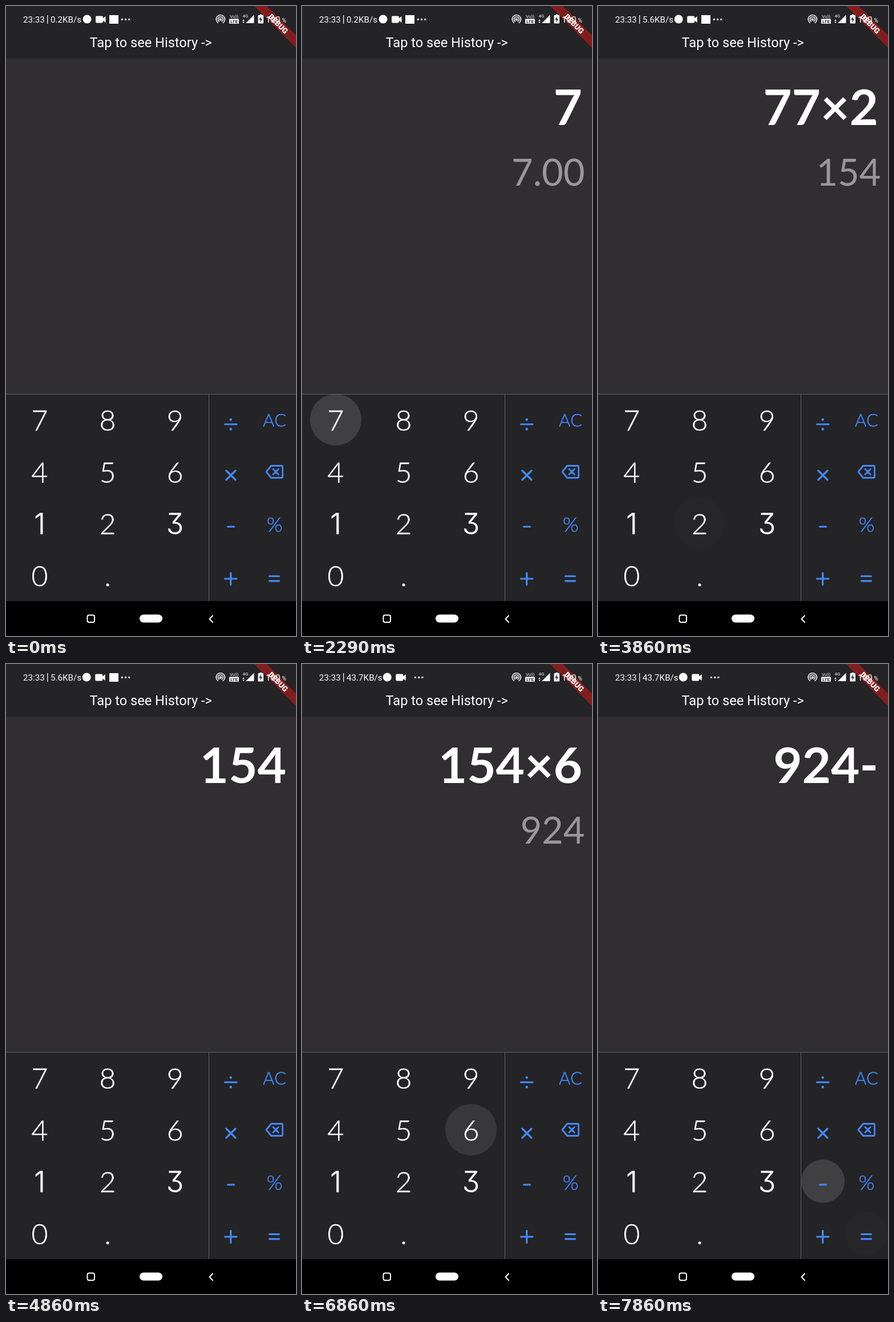
An HTML page that plays this animation: 508 by 1101 pixels, repeating every 8000 ms.

```html
<!DOCTYPE html>
<html lang="en">
<head>
<meta charset="utf-8">
<title>Calculator</title>
<style>
  html, body { margin: 0; width: 100%; height: 100%; overflow: hidden; background: #000; }
  svg { display: block; width: 100%; height: 100%; }
  text { fill: #fff; }
  .line { fill: none; stroke-linecap: round; stroke-linejoin: round; }
  .status { font: 15.2px Roboto, sans-serif; }
  .tiny { font: 8px Roboto, sans-serif; }
  .key { font: 300 50px Lato, sans-serif; text-anchor: middle; stroke: #fff; stroke-width: .5; stroke-linejoin: round; }
  .plain { font-family: Inter, sans-serif; font-feature-settings: "cv09"; }
  .blue { fill: #448aff; stroke: #448aff; }
  .output { text-anchor: end; font-family: Lato, sans-serif; }
</style>
</head>
<body>
<svg viewBox="0 0 508 1101" preserveAspectRatio="none">
  <rect width="508" height="1101" fill="#302e31"/>
  <rect width="508" height="92" fill="#242326"/>
  <rect y="678" width="508" height="362" fill="#242326"/>
  <g id="ripples" fill="#fff"></g>
  <path d="M0 678.5H508M355.5 678V1040" stroke="#55676b" fill="none"/>
  <rect y="1040" width="508" height="61"/>

  <text x="253.7" y="72" text-anchor="middle" font-family="Roboto, sans-serif" font-size="23.6">Tap to see History -&gt;</text>
  <text id="expression" class="output" x="491" y="208" font-size="87" font-weight="700"/>
  <text id="result" class="output" x="495.5" y="314" font-size="65" style="fill:#98979a"/>

  <g id="keys"></g>
  <g class="line" stroke="#448aff" stroke-width="3.2">
    <path d="M383.5 731H404M385.8 812L402 828M402 812L385.8 828M388.5 910H399.5M383.5 1001H404M393.7 990.5V1011.5M461.5 996.5H478.5M461.5 1004.8H478.5"/>
    <path d="M393.7 722.7v.01M393.7 739.4v.01" stroke-width="4.6"/>
    <path d="M464.5 803.5H482.5Q484.5 803.5 484.5 805.5V822.5Q484.5 824.5 482.5 824.5H464.5L456 814ZM468 809.3L477.3 818.7M477.3 809.3L468 818.7" stroke-width="2.8"/>
  </g>

  <!-- Corner ribbon -->
  <g transform="translate(508 0) rotate(45)">
    <rect x="-80" y="36.2" width="160" height="15.6" fill="#b71c1c" opacity=".63"/>
    <text y="48.7" text-anchor="middle" font-family="Roboto, sans-serif" font-size="13.2" font-weight="900">DEBUG</text>
  </g>

  <!-- Status bar -->
  <text class="status" x="30" y="28.5">23:33</text>
  <path d="M72.8 16V31" stroke="#fff" stroke-width="1.3"/>
  <text id="speed" class="status" x="78" y="28.5"/>
  <g id="notices" fill="#fff">
    <circle cx="142" cy="23" r="7.5"/>
    <path d="M159 17.5h9q2 0 2 2v2l4.5-3.5v11l-4.5-3.5v2q0 2-2 2h-9q-2 0-2-2v-8q0-2 2-2Z"/>
  </g>
  <rect id="square" x="181" y="16" width="16" height="15" fill="#fff"/>
  <path id="dots" class="line" d="M203.5 23.5v.01M209.7 23.5v.01M215.9 23.5v.01" stroke="#fff" stroke-width="3.4"/>
  <g class="line" stroke="#fff" stroke-width="1.6">
    <path d="M371.3 29.4A7.6 7.6 0 1 1 380.3 29.4M373.2 26.7A4.4 4.4 0 1 1 378.4 26.7"/>
    <circle cx="375.8" cy="23.5" r="1.4" fill="#fff"/>
  </g>
  <text class="tiny" x="392" y="21" font-weight="700">Vo))</text>
  <rect x="391" y="22.5" width="17" height="8.5" rx="1" fill="#fff"/>
  <text class="tiny" x="399.5" y="29.8" text-anchor="middle" style="fill:#242326;font-weight:700">LTE</text>
  <text class="tiny" x="414.5" y="20">4G</text>
  <path d="M434.5 15.5V30H420Z M414 26l2-2.5 2 2.5Z M414 27.5l2 2.5 2-2.5Z" fill="#fff"/>
  <path d="M444.5 16V14.7h3.5V16h2q1 0 1 1V29.5q0 1-1 1h-7.5q-1 0-1-1V17q0-1 1-1Z" fill="#fff"/>
  <path d="M447 18l-3.8 6h2.6l-.6 4.7 3.9-6.2h-2.7Z" fill="#242326"/>
  <text class="status" x="455" y="28.5">100</text>
  <text x="483.5" y="28.5" font-family="Roboto, sans-serif" font-size="10">%</text>

  <!-- Navigation bar -->
  <rect x="142.5" y="1064.5" width="12.5" height="12.5" rx="3" fill="none" stroke="#fff" stroke-width="2"/>
  <rect x="234" y="1063.5" width="40" height="14" rx="7" fill="#fff"/>
  <path class="line" d="M362 1065.5L356.5 1071.2L362 1077" stroke="#fff" stroke-width="2"/>
</svg>
<script>
const LOOP = 8000, FPS = 7, FADE = 3.2;
const columns = [59, 178, 296, 394, 470];
const rows = [723, 814, 904, 995];
const layout = ["789÷C", "456×<", "123-%", "0. +="];
const byId = id => document.getElementById(id);

function add(parent, tag, attributes, content = "") {
  const node = document.createElementNS("http://www.w3.org/2000/svg", tag);
  for (const name in attributes) node.setAttribute(name, attributes[name]);
  node.textContent = content;
  return parent.appendChild(node);
}

const place = key => {
  const row = layout.findIndex(line => line.includes(key));
  const column = layout[row].indexOf(key);
  return { x: columns[column], y: rows[row], radius: column < 3 ? 45 : 38 };
};

for (const key of "7894561230.") {
  const { x, y } = place(key);
  add(byId("keys"), "text", { x, y: y + 19, class: "13".includes(key) ? "key plain" : "key" }, key);
}
add(byId("keys"), "text", { x: 470.5, y: 735, class: "key blue", style: "font-size:31px" }, "AC");
add(byId("keys"), "text", { x: 470.5, y: 918.5, class: "key blue", style: "font-size:36px" }, "%");

// step of the tap, key, expression and result it leaves behind
const taps = [
  [16, "7", "7", "7.00"],
  [18, "7", "77", "77.00"],
  [21, "×", "77×", "77.00"],
  [24, "2", "77×2", "154"],
  [30, "=", "154", ""],
  [39, "×", "154×", ""],
  [47, "6", "154×6", "924"],
  [52, "=", "924", ""],
  [55, "-", "924-", ""]
].map(([step, key, expression, result]) => {
  const { x, y, radius } = place(key);
  const ripple = add(byId("ripples"), "circle", { cx: x, cy: y });
  return { step, expression, result, radius, ripple };
});

function drawRipple({ step, radius, ripple }, now) {
  const age = now - step;
  const strength = age < -1 ? 0 : age < 0 ? 0.6 : Math.max(0, 1 - age / FADE);
  ripple.setAttribute("r", age < 0 ? radius * 0.7 : radius);
  ripple.setAttribute("opacity", strength * 0.13);
}

function draw(time) {
  const now = Math.floor((time % LOOP + 4) * FPS / 1000);
  const last = taps.filter(tap => tap.step <= now).pop();
  byId("expression").textContent = last ? last.expression : "";
  byId("result").textContent = last ? last.result : "";
  taps.forEach(tap => drawRipple(tap, now));

  const busy = now >= 48;
  byId("speed").textContent = busy ? "43.7KB/s" : now >= 23 ? "5.6KB/s" : "0.2KB/s";
  byId("notices").setAttribute("transform", `translate(${busy ? 7.3 : now >= 23 ? -0.8 : 0})`);
  byId("square").setAttribute("visibility", busy ? "hidden" : "visible");
  byId("dots").setAttribute("transform", `translate(${busy ? -5 : 0})`);
}

const start = performance.now();
function tick() {
  draw(performance.now() - start);
  requestAnimationFrame(tick);
}
tick();
</script>
</body>
</html>
```
